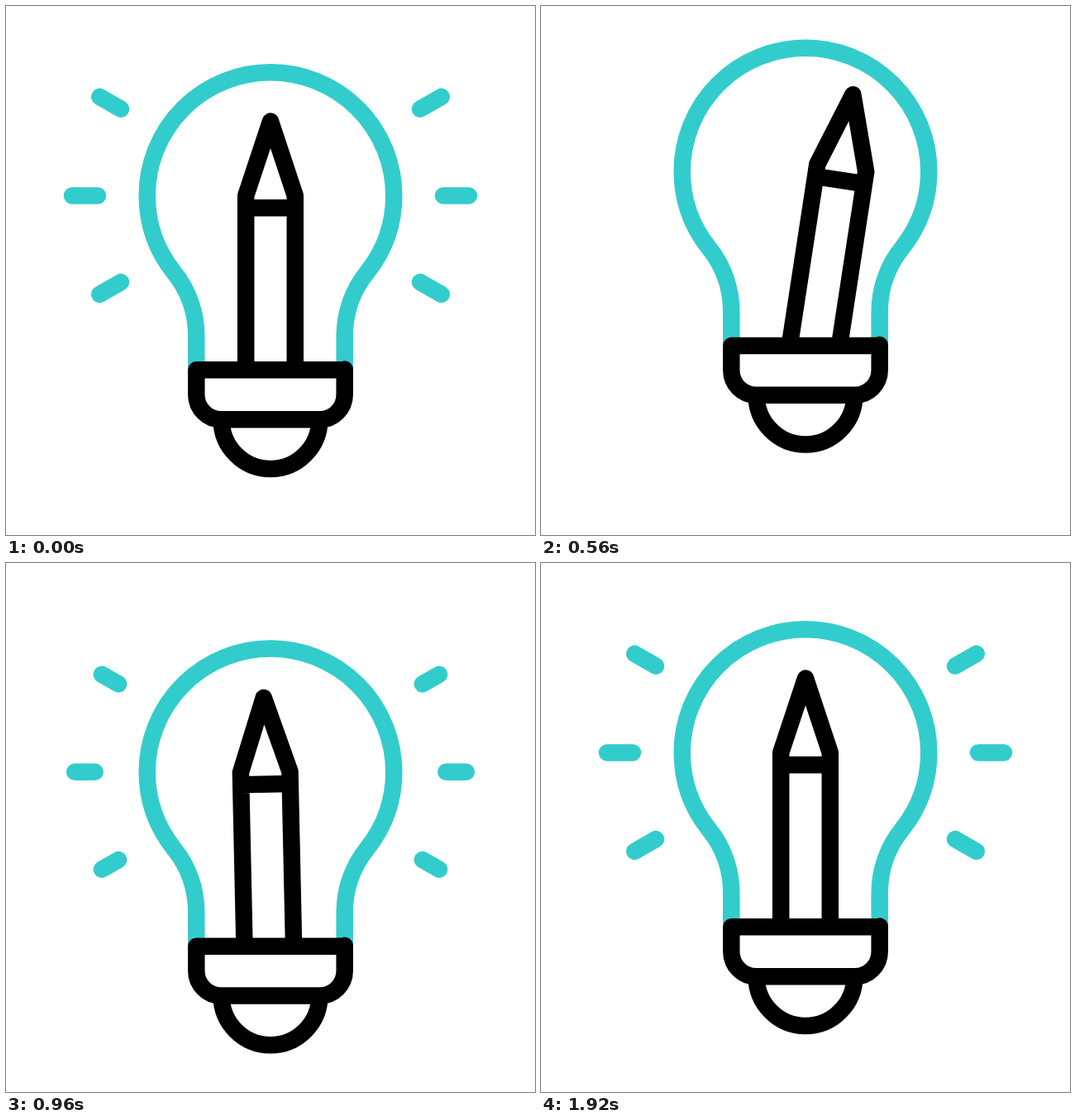
An HTML page with a canvas for the animation above (2000 ms loop, 640 by 640 pixels).

```html
<!DOCTYPE html>
<html lang="en">
<head>
<meta charset="utf-8">
<title>Idea bulb</title>
<style>
  html, body { margin: 0; width: 100%; height: 100%; overflow: hidden; background: #fff; }
  canvas { display: block; width: 640px; height: 640px; }
</style>
</head>
<body>
<canvas id="stage" width="640" height="640"></canvas>
<script>
const ctx = document.getElementById('stage').getContext('2d');
const LOOP = 2000, STEP = 40;
const TEAL = '#33cccc', BLACK = '#000';

// Keys are [time, value]; each span eases in and out.
const keys = {
  lift: [[80, 0], [320, 38.5], [600, -33.4], [840, 38.5], [1120, 0]],
  slide: [[80, 0], [320, 27], [600, -9.4], [840, 0]],
  tilt: [[80, 0], [320, -11.9], [600, 9.9], [840, -6.7], [1080, 4.2], [1300, 0]]
};
// Rays: spans in which the inner end shrinks away and the outer end grows.
const cycles = [
  { grow: [-400, 0], shrink: [80, 560] },
  { grow: [640, 1040], shrink: [845, 1405] },
  { grow: [1440, 1920], shrink: [2080, 2560] }
];

function ease(t, a, b) {
  const x = Math.min(1, Math.max(0, (t - a) / (b - a)));
  return x * x * (3 - 2 * x);
}

function valueAt(list, t) {
  let v = list[0][1];
  for (let i = 1; i < list.length; i++) {
    const [t0, v0] = list[i - 1], [t1, v1] = list[i];
    if (t >= t0) v = v0 + (v1 - v0) * ease(t, t0, t1);
  }
  return v;
}

const bulb = new Path2D(
  'M230.3 440V399.5C230.3 371 220.5 343.5 203 322' +
  'C182.7 296.4 170.7 264.4 170.7 229.5A149.3 149.3 0 0 1 469.3 229.5' +
  'C469.3 264.4 457.3 296.4 437 322C419.5 343.5 409.7 371 409.7 399.5V440');
const base = new Path2D(
  'M409.7 439.4V470.2A30 30 0 0 1 379.7 500.2H260.3A30 30 0 0 1 230.3 470.2V440.3H409.7');
const cup = new Path2D('M260.6 500.2A59.4 59.8 0 0 0 379.4 500.2');
const pencil = new Path2D(
  'M290.2 540V229.5L320 139.6L349.8 229.5V540M290.2 244.2H349.8');

function stroke(path, color, cap) {
  ctx.strokeStyle = color;
  ctx.lineCap = cap;
  ctx.stroke(path);
}

function drawRays(t) {
  for (const { grow, shrink } of cycles) {
    const near = ease(t, ...shrink), far = ease(t, ...grow);
    if (far <= near) continue;
    const rays = new Path2D();
    const add = (x0, y0, x1, y1) => {
      const x = k => x0 + (x1 - x0) * k, y = k => y0 + (y1 - y0) * k;
      rays.moveTo(x(near), y(near));
      rays.lineTo(x(far), y(far));
      rays.moveTo(640 - x(near), y(near));
      rays.lineTo(640 - x(far), y(far));
    };
    add(139, 124.7, 113.2, 109.9);
    add(111, 229.5, 80, 229.5);
    add(139, 334.1, 113.2, 348.9);
    stroke(rays, TEAL, 'round');
  }
}

function drawPencil(t) {
  ctx.save();
  ctx.beginPath();
  ctx.rect(0, -100, 640, 540);
  ctx.clip();
  ctx.translate(320, 519 + valueAt(keys.slide, t));
  ctx.rotate(valueAt(keys.tilt, t) * Math.PI / 180);
  ctx.translate(-320, -519);
  stroke(pencil, BLACK, 'butt');
  ctx.restore();
}

function draw(t) {
  ctx.setTransform(1, 0, 0, 1, 0, 0);
  ctx.fillStyle = '#fff';
  ctx.fillRect(0, 0, 640, 640);
  ctx.lineWidth = 20.5;
  ctx.lineJoin = 'round';
  ctx.translate(0, valueAt(keys.lift, t));
  drawRays(t);
  stroke(bulb, TEAL, 'butt');
  drawPencil(t);
  stroke(cup, BLACK, 'butt');
  stroke(base, BLACK, 'round');
}

const start = performance.now();
function tick() {
  const t = (performance.now() - start) % LOOP;
  draw(Math.floor(t / STEP) * STEP);
  requestAnimationFrame(tick);
}
tick();
</script>
</body>
</html>
```
